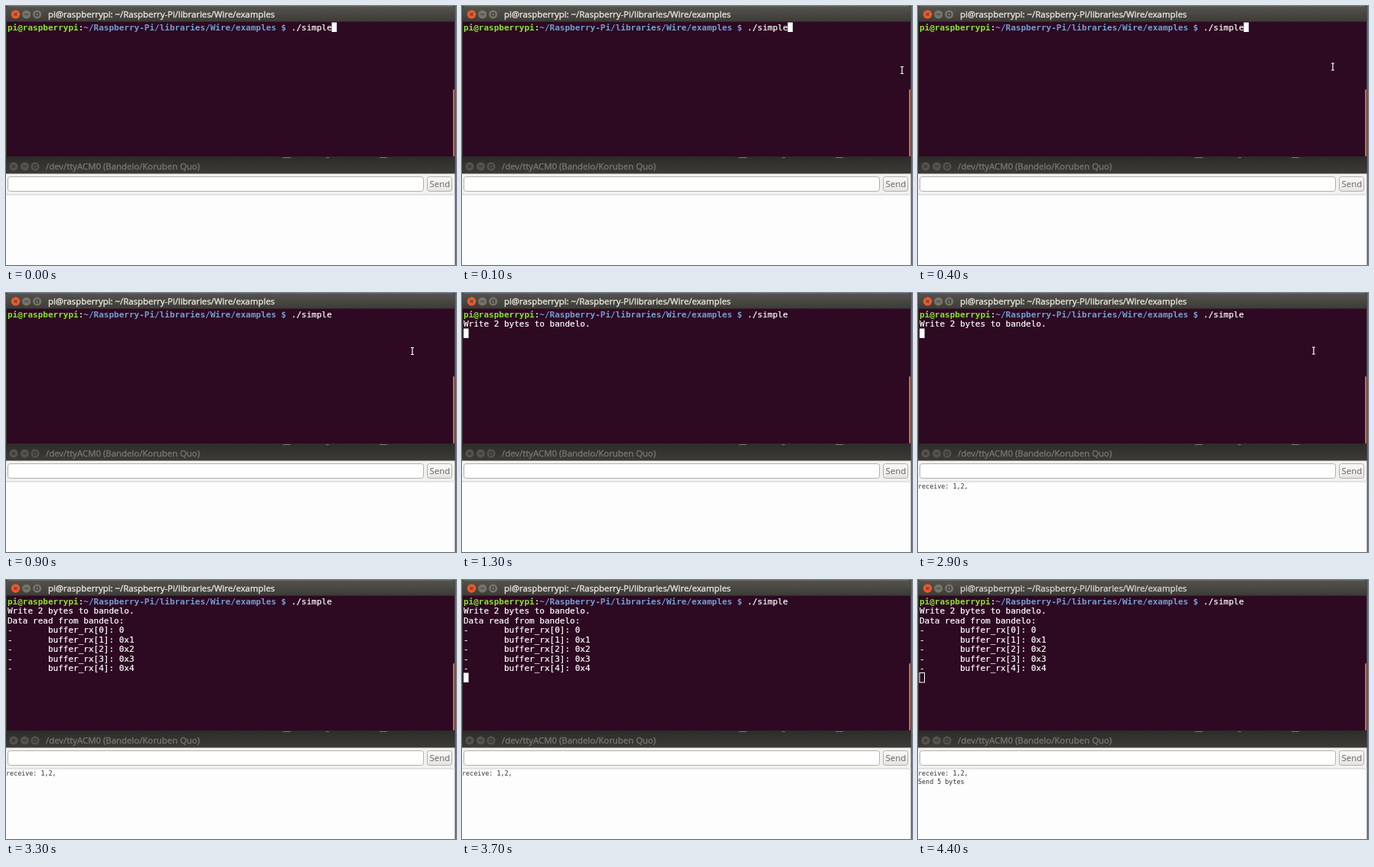
An HTML page for the animation above (4.6 s loop, 588 px wide and 339 px high).

```html
<!DOCTYPE html>
<html lang="en">
<head>
<meta charset="utf-8">
<title>Terminal and serial monitor</title>
<style>
html, body { margin: 0; width: 100%; height: 100%; overflow: hidden; background: #3b3a36; }
svg { display: block; width: 588px; height: 339px; }
text { white-space: pre; }
.title { font: 11.4px "Open Sans", "Noto Sans", sans-serif; fill: currentColor; stroke: currentColor; stroke-width: .4px; }
.send { font: 11.4px "Open Sans", "Noto Sans", sans-serif; fill: #626262; }
.term { font: 11px "DejaVu Sans Mono", monospace; fill: #fff; }
.term text { stroke: #fff; stroke-width: .2px; }
.term .bold { font-weight: bold; stroke: none; }
.user { fill: #8ae234; }
.path { fill: #729fcf; }
.serial { font: 8.4px "DejaVu Sans Mono", monospace; fill: #333; }

/* Hard on/off changes on a 4.6 s loop */
.step { animation: 4.6s step-end infinite; }
#promptCursor { animation-name: promptCursor; }
#waitCursor { animation-name: waitCursor; }
#endCursor { animation-name: endCursor; }
#idleCursor { animation-name: idle; }
#written { animation-name: written; }
#received { animation-name: received; }
#data { animation-name: data; }
#sent { animation-name: sent; }
#heading { animation-name: heading; }
#pointer { animation-name: pointer; }

@keyframes promptCursor { 0% { opacity: 1 } 15.2%, 100% { opacity: 0 } }
@keyframes written { 0% { opacity: 0 } 28.25%, 100% { opacity: 1 } }
@keyframes waitCursor {
  0% { opacity: 0 } 28.25% { opacity: 1 } 41.3% { opacity: 0 }
  54.34% { opacity: 1 } 67.38%, 100% { opacity: 0 }
}
@keyframes received { 0% { opacity: 0 } 39.12%, 100% { opacity: 1 } }
@keyframes data { 0% { opacity: 0 } 67.38%, 100% { opacity: 1 } }
@keyframes endCursor { 0% { opacity: 0 } 80.42% { opacity: 1 } 93.47%, 100% { opacity: 0 } }
@keyframes sent { 0% { opacity: 0 } 82.6%, 100% { opacity: 1 } }
@keyframes idle { 0% { opacity: 0 } 93.47%, 100% { opacity: 1 } }
@keyframes heading { 0% { color: #e4e1d9 } 93.47%, 100% { color: #d3cfc6 } }
@keyframes pointer {
  0% { opacity: 0; transform: translate(575px, 84px) }
  2.17% { opacity: 1; transform: translate(575px, 84px) }
  4.34% { opacity: 1; transform: translate(564px, 83px) }
  6.52% { opacity: 1; transform: translate(553px, 82px) }
  8.69% { opacity: 1; transform: translate(542px, 79.5px) }
  10.86% { opacity: 1; transform: translate(531px, 76px) }
  28.25% { opacity: 0; transform: translate(531px, 76px) }
  45.64% { opacity: 1; transform: translate(518.5px, 75.5px) }
  54.34% { opacity: 1; transform: translate(517px, 75.5px) }
  65.2% { opacity: 1; transform: translate(524px, 76px) }
  67.38% { opacity: 1; transform: translate(532px, 75px) }
  69.56% { opacity: 1; transform: translate(540px, 74px) }
  71.73%, 100% { opacity: 0; transform: translate(540px, 74px) }
}
</style>
</head>
<body>
<svg viewBox="0 0 588 339">
  <defs>
    <linearGradient id="bar" x2="0" y2="1">
      <stop offset="0" stop-color="#55534d"/>
      <stop offset="1" stop-color="#3c3b37"/>
    </linearGradient>
    <linearGradient id="shade" x2="0" y2="1">
      <stop offset="0" stop-color="#2d2c29"/>
      <stop offset="1" stop-color="#3c3b37"/>
    </linearGradient>
    <linearGradient id="face" x2="0" y2="1">
      <stop offset="0" stop-color="#fbfafa"/>
      <stop offset="1" stop-color="#e6e4e1"/>
    </linearGradient>
  </defs>

  <!-- Desktop edge -->
  <rect width="588" height="339" fill="#3b3a36"/>
  <rect x="586.5" width="1.5" height="339" fill="#5d6672"/>

  <!-- Terminal window -->
  <path d="M0 21V4Q0 0 4 0H583Q586.5 0 586.5 4V21Z" fill="url(#bar)"/>
  <path d="M4 .5H583" stroke="#68665f"/>
  <circle cx="12.5" cy="11" r="5.8" fill="#e9582f"/>
  <g fill="#76736a">
    <circle cx="26.7" cy="11" r="5.6"/>
    <circle cx="40.7" cy="11" r="5.6"/>
  </g>
  <path d="M10.5 9l4 4m0-4l-4 4M24.3 11h4.8M38.7 9h4v4h-4z" fill="none" stroke="#35322d"/>
  <text id="heading" class="title step" x="55" y="15">pi@raspberrypi: ~/Raspberry-Pi/libraries/Wire/examples</text>
  <rect x="1" y="20.5" width="585" height="176.5" fill="#2d0922"/>
  <rect x="584" y="109" width="2" height="88" rx="1" fill="#d9623c"/>

  <g class="term">
    <text x="2" y="32"><tspan class="bold user">pi@raspberrypi</tspan>:<tspan class="bold path">~/Raspberry-Pi/libraries/Wire/examples $</tspan> ./simple</text>
    <text id="written" class="step" x="2" y="44">Write 2 bytes to bandelo.</text>
    <g id="data" class="step">
      <text x="2" y="57">Data read from bandelo:</text>
      <text x="2" y="69">-       buffer_rx[0]: 0</text>
      <text x="2" y="82">-       buffer_rx[1]: 0x1</text>
      <text x="2" y="94">-       buffer_rx[2]: 0x2</text>
      <text x="2" y="107">-       buffer_rx[3]: 0x3</text>
      <text x="2" y="119">-       buffer_rx[4]: 0x4</text>
    </g>
    <rect id="promptCursor" class="step" x="425.6" y="21.5" width="6.6" height="12.5"/>
    <rect id="waitCursor" class="step" x="2" y="46.5" width="6.6" height="12.5"/>
    <rect id="endCursor" class="step" x="2" y="121.5" width="6.6" height="12.5"/>
    <rect id="idleCursor" class="step" x="2" y="121.5" width="6.5" height="12.5" style="fill:none;stroke:#fff"/>
  </g>

  <!-- Serial monitor window -->
  <rect y="197" width="586.5" height="22.5" fill="url(#shade)"/>
  <path d="M362 198.5h10M418 198.5h4M488 198.5h10" stroke="#77756f"/>
  <g fill="#55524c">
    <circle cx="10" cy="210" r="5.6"/>
    <circle cx="24.5" cy="210" r="5.6"/>
    <circle cx="38" cy="210" r="5.6"/>
  </g>
  <path d="M8 208l4 4m0-4l-4 4M22.1 210h4.8M36 208h4v4h-4z" fill="none" stroke="#2b2926"/>
  <text class="title" x="52" y="214" color="#77746d">/dev/ttyACM0 (Bandelo/Koruben Quo)</text>
  <rect y="219.5" width="586.5" height="28" fill="#f2f1f0"/>
  <rect x="2.5" y="223.5" width="543" height="19" rx="3" fill="#fff" stroke="#b4afa8"/>
  <rect x="550.5" y="223.5" width="32" height="19" rx="3" fill="url(#face)" stroke="#b4afa8"/>
  <text class="send" x="553.5" y="237">Send</text>
  <rect y="246.5" width="586.5" height="92.5" fill="#fefdfe"/>
  <path d="M0 247H586" stroke="#d0ccc8"/>
  <g class="serial">
    <text id="received" class="step" x="0" y="256">receive: 1,2,</text>
    <text id="sent" class="step" x="0" y="267">Send 5 bytes</text>
  </g>

  <g id="pointer" class="step">
    <path d="M-2-4.5H2M0-4.5V4.5M-2 4.5H2" fill="none" stroke="#fff" stroke-width="1.2"/>
  </g>
</svg>
</body>
</html>
```
